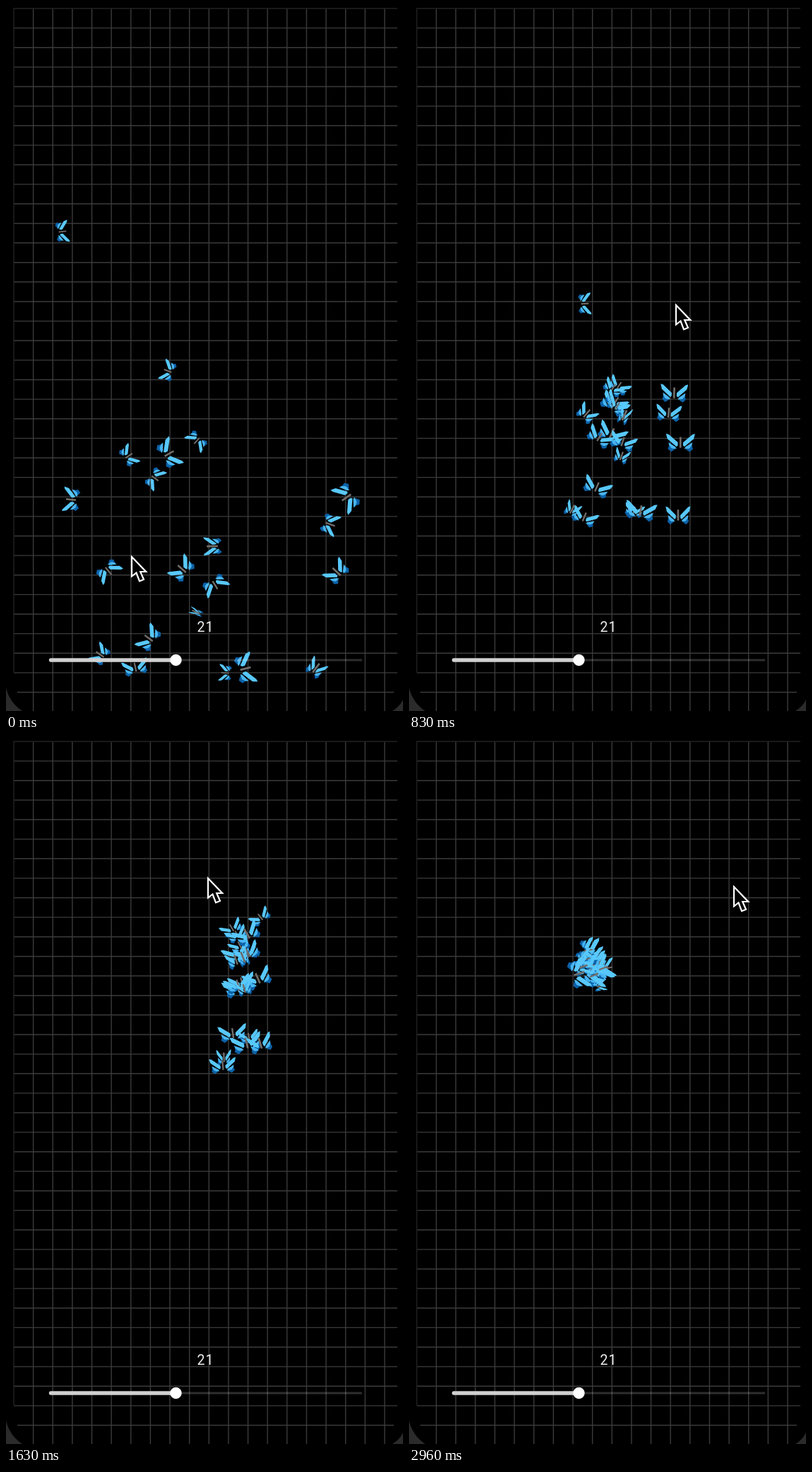
Recreate the animation shown at these times as an HTML page. Size 562 by 997 pixels, loop 3 s.

```html
<!DOCTYPE html>
<html lang="en">
<head>
<meta charset="utf-8">
<title>Butterflies</title>
<style>
html, body { margin: 0; width: 100%; height: 100%; overflow: hidden; background: #000; }
svg { display: block; width: 100%; height: 100%; }
</style>
</head>
<body>
<svg viewBox="0 0 562 997">
  <defs>
    <g id="wing">
      <path d="M4 4V0L18 -11L22 -12L20 -5L6 6Z" fill="#58c8fb"/>
      <path d="M6 9L8 6L18 0L17 6L14 9Z" fill="#48b5f0"/>
      <path d="M8 9.5L14 8L17 4L19 9L14 13Z" fill="#0c62a8"/>
    </g>
    <path id="body" d="M0 -7.5V7.5" stroke="#716c69" stroke-width="2.6"/>
  </defs>
  <rect width="562" height="997"/>
  <path id="grid" stroke="#3b3b3b" stroke-width="1.4"/>
  <path d="M11 3V942M11 3.5H554" stroke="#222" stroke-width="1.4"/>
  <path d="M0 964Q5 985 23 997H0ZM562 981Q557 991 547 997H562Z" fill="#2b2b2b"/>
  <g id="flock"></g>
  <text x="282.5" y="885" fill="#eee" font-family="Roboto, sans-serif" font-size="19.5" letter-spacing="1" text-anchor="middle">21</text>
  <path d="M240 925H504" stroke="#fff" stroke-opacity=".18" stroke-width="3"/>
  <path d="M63.5 925H240" stroke="#d0d0d0" stroke-width="5.4" stroke-linecap="round"/>
  <circle cx="240.5" cy="925" r="8.2" fill="#fff"/>
  <path id="pointer" d="M0 1.9V29.5L6.5 24.5L11 36.4L17 34L12.2 23H20.2Z" stroke="#fff" stroke-width="2.2"/>
</svg>
<script>
const LOOP = 3000, FPS = 24, STEPS = 72, CELL = 27.63;
const TOP_SPEED = 15, MAX_STEER = 1.5, SLOW_RADIUS = 70, SETTLE_STEPS = 9;
const byId = id => document.getElementById(id);

// step, x, y
const pointerPath = [
  [0, 178, 777], [9, 307, 504], [20, 378, 421], [27, 383, 324], [39, 286, 195], [45, 228, 235],
  [51, 213, 456], [55, 240, 490], [60, 350, 450], [65, 472, 270], [71, 460, 207]
];

// Where each butterfly sets off
const perches = [
  [80, 319], [229, 516], [270, 615], [231, 633], [174, 636], [211, 668], [92, 698],
  [482, 695], [459, 733], [292, 764], [249, 796], [145, 799], [468, 800], [296, 819],
  [269, 857], [202, 894], [133, 917], [183, 935], [310, 943], [339, 937], [439, 936]
];

const noise = (i, salt) => {
  const v = Math.sin(i * 12.9898 + salt * 78.233) * 43758.5453;
  return v - Math.floor(v);
};
const mix = (a, b, k) => a + (b - a) * k;

// Smooth curve through [step, x, y] points
function along(points, step) {
  const last = points.length - 1;
  let k = 0;
  while (k < last - 1 && step > points[k + 1][0]) k++;
  const a = points[k], b = points[k + 1], span = b[0] - a[0], u = (step - a[0]) / span;
  const slope = (n, axis) => {
    const p = points[Math.max(0, n - 1)], q = points[Math.min(last, n + 1)];
    return (q[axis] - p[axis]) / (q[0] - p[0]) * span;
  };
  return [1, 2].map(axis =>
    mix(a[axis], b[axis], u * u * (3 - 2 * u)) +
    slope(k, axis) * u * (1 - u) ** 2 - slope(k + 1, axis) * u * u * (1 - u));
}

// Steer towards the pointer, slowing down close to it
function fly([x, y], i) {
  const topSpeed = TOP_SPEED * mix(.92, 1.04, noise(i, 1));
  const aimX = mix(-12, 12, noise(i, 2)), aimY = mix(-12, 12, noise(i, 3));
  const twist = mix(-150, 150, noise(i, 4));
  const poses = [];
  let vx = 0, vy = 0;
  for (let step = 0; step < STEPS; step++) {
    const [px, py] = along(pointerPath, step);
    const dx = px + aimX - x, dy = py + aimY - y;
    const speed = topSpeed / Math.max(SLOW_RADIUS, Math.hypot(dx, dy));
    const steerX = dx * speed - vx, steerY = dy * speed - vy;
    const limit = Math.min(1, MAX_STEER / Math.hypot(steerX, steerY));
    vx += steerX * limit;
    vy += steerY * limit;
    const travel = Math.atan2(vx, -vy) * 180 / Math.PI;
    poses.push({ x, y, heading: travel + twist * Math.max(0, 1 - step / SETTLE_STEPS) });
    x += vx;
    y += vy;
  }
  return poses;
}

const flies = perches.map((perch, i) => {
  const node = document.createElementNS('http://www.w3.org/2000/svg', 'g');
  node.innerHTML = '<use href="#body"/><use href="#wing"/><use href="#wing"/>';
  byId('flock').append(node);
  return { node, poses: fly(perch, i), size: mix(.7, 1.05, noise(i, 5)), phase: noise(i, 6) };
});

function drawFly({ node, poses, size, phase }, step) {
  const { x, y, heading } = poses[step];
  const open = .12 + .88 * Math.sqrt(Math.abs(Math.cos(Math.PI * (step / 9.5 + phase))));
  const [, left, right] = node.children;
  node.setAttribute('transform', `translate(${x} ${y}) rotate(${heading}) scale(${size})`);
  left.setAttribute('transform', `scale(${-open} 1)`);
  right.setAttribute('transform', `scale(${open} 1)`);
}

function drawGrid() {
  let lines = 'M16 970.5H549';
  for (let i = 1; i < 20; i++) lines += `M${11 + i * CELL} 3V997`;
  for (let i = 1; i < 35; i++) lines += `M11 ${3.5 + i * CELL}H554`;
  byId('grid').setAttribute('d', lines);
}

function update(ms) {
  const tick = Math.floor(ms % LOOP / 10) * 10;
  const step = Math.floor((tick + 4.9) * FPS / 1000);
  flies.forEach(item => drawFly(item, step));
  byId('pointer').setAttribute('transform', `translate(${along(pointerPath, step)})`);
}

drawGrid();
update(0);
const begin = performance.now();
requestAnimationFrame(function loop() {
  update(performance.now() - begin);
  requestAnimationFrame(loop);
});
</script>
</body>
</html>
```
